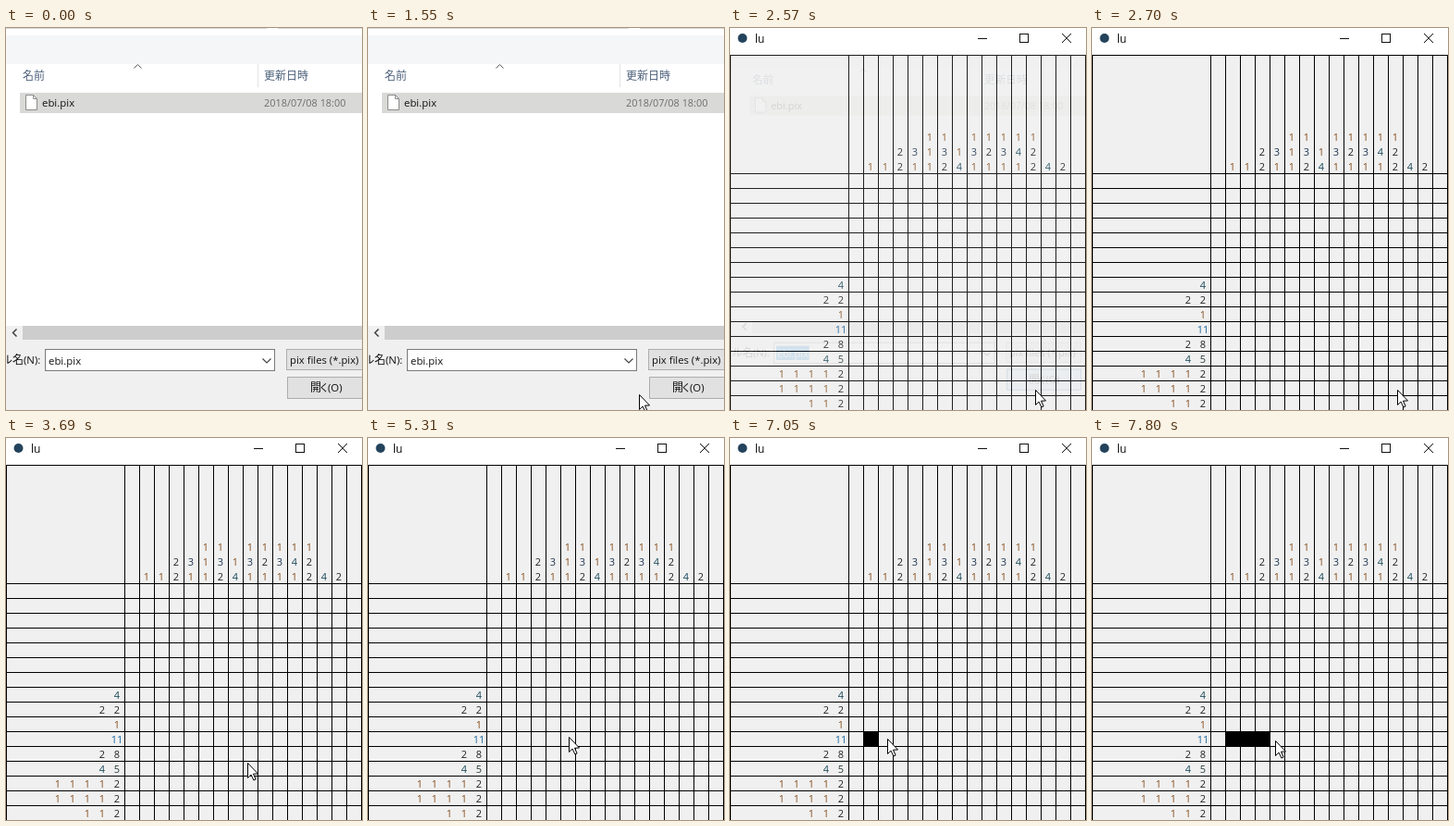
These frames come from a looping animation (385x413 px, 8000 ms). An HTML page with a canvas:

```html
<!DOCTYPE html>
<html lang="ja">
<head>
<meta charset="utf-8">
<title>Puzzle</title>
<style>
  html, body { margin: 0; width: 100%; height: 100%; overflow: hidden; background: #fff; }
  canvas { display: block; }
</style>
</head>
<body>
<canvas id="stage" width="385" height="413"></canvas>
<script>
const ctx = document.getElementById('stage').getContext('2d');
const W = 385, H = 413, LOOP = 8000, CELL = 16, LEFT = 128, TOP = 157;
const LATIN = '"Open Sans", "Noto Sans", sans-serif';
const KANJI = '"Noto Sans CJK JP", "Noto Sans CJK", sans-serif';

const PRESS = 2300, SELECT = 2440, FADE = 2570, READY = 2700;
const FILLS = [6810, 7300, 7550];

// Pointer moves: first step, last step, step count, end x, end y
const START = [304, 414];
const MOVES = [
  [680, 1180, 5, 281, 397],
  [1430, 1800, 4, 330, 391],
  [3070, 3320, 3, 241, 342],
  [3690, 3690, 1, 261, 351],
  [3810, 3810, 1, 273, 351],
  [4060, 4060, 1, 266, 363],
  [4180, 4430, 3, 235, 331],
  [4810, 4930, 2, 227, 324],
  [5310, 5310, 1, 217, 323],
  [5430, 5560, 2, 206, 322],
  [5930, 6060, 2, 157, 323],
  [6310, 6310, 1, 157, 325],
  [6810, 7050, 3, 170, 325],
  [7300, 7800, 5, 198, 327]
];

const COLS = ['', '1', '1', '22', '31', '111', '132', '14', '131',
  '121', '131', '141', '122', '4', '2'];
const ROWS = ['4', '2 2', '1', '11', '2 8', '4 5', '1 1 1 1 2', '1 1 1 1 2', '1 1 2'];
const INK = { 1: '#86501f', 2: '#222222', 3: '#1d3350', 4: '#164656',
  5: '#2a3a3a', 8: '#222222', 11: '#1c66a0' };

function rect(x, y, w, h, color) {
  ctx.fillStyle = color;
  ctx.fillRect(x, y, w, h);
}

function box(x, y, w, h, fill, edge) {
  rect(x, y, w, h, edge);
  rect(x + 1, y + 1, w - 2, h - 2, fill);
}

function line(points, color, width = 1, close = false) {
  ctx.beginPath();
  points.forEach(([x, y]) => ctx.lineTo(x, y));
  if (close) ctx.closePath();
  ctx.strokeStyle = color;
  ctx.lineWidth = width;
  ctx.stroke();
}

function text(str, x, y, size, color, family = LATIN, align = 'left') {
  ctx.font = `${size}px ${family}`;
  ctx.textAlign = align;
  ctx.fillStyle = color;
  ctx.fillText(str, x, y);
}

function pointer(t) {
  let [x, y] = START;
  for (const [from, to, n, ex, ey] of MOVES) {
    if (t < from) break;
    const step = n > 1 ? Math.floor((t - from) / (to - from) * (n - 1) + 1e-6) + 1 : 1;
    const p = Math.min(step, n) / n;
    x += (ex - x) * p;
    y += (ey - y) * p;
    if (p < 1) break;
  }
  return [Math.round(x), Math.round(y)];
}

function drawPointer(x, y) {
  const shape = [[0, 0], [0, 16], [3.6, 12.6], [6.4, 18.5], [8.6, 17.5], [6, 11.7], [11, 11.5]]
    .map(([px, py]) => [x + px + 0.5, y + py + 0.5]);
  ctx.beginPath();
  shape.forEach(([px, py]) => ctx.lineTo(px, py));
  ctx.closePath();
  ctx.fillStyle = '#fff';
  ctx.fill();
  line(shape, '#000', 1, true);
}

function drawFileIcon() {
  const page = [[21.5, 72.5], [29.5, 72.5], [33.5, 76.5], [33.5, 88.5], [21.5, 88.5]];
  ctx.beginPath();
  page.forEach(([x, y]) => ctx.lineTo(x, y));
  ctx.fillStyle = '#fff';
  ctx.fill();
  line(page, '#8c8c8c', 1, true);
  line([[29.5, 72.5], [29.5, 76.5], [33.5, 76.5]], '#8c8c8c');
}

function drawDialog(t, px, py) {
  // Drawn past the stage so that it can shrink while closing
  rect(-40, -40, 480, 500, '#fff');
  rect(-40, 0, 322, 1, '#d9d9d9');
  rect(294, 0, 140, 1, '#d9d9d9');
  rect(-40, 8, 480, 31, '#f5f6f8');
  line([[138.5, 43.5], [142.5, 39.5], [146.5, 43.5]], '#5c5c5c');
  rect(272, 39, 1, 25, '#e2e2e2');
  text('名前', 18, 56, 12, '#4c607a', KANJI);
  text('更新日時', 279, 56, 12, '#4c607a', KANJI);

  rect(15, 70, 400, 22, '#d9d9d7');
  drawFileIcon();
  text('ebi.pix', 39, 85, 11.4, '#111');
  text('2018/07/08 18:00', 279, 85, 10.9, '#6d6d6d');

  rect(-40, 322, 480, 140, '#f0f0f0');
  rect(18, 322, 420, 15, '#cdcdcd');
  line([[11.5, 325.5], [7.5, 329.5], [11.5, 333.5]], '#404040', 1.5);

  text('ファイル名', 19, 363, 12, '#111', KANJI, 'right');
  text('(N):', 19, 363, 11.4, '#111');
  box(42, 347, 249, 24, '#fff', '#7a7a7a');
  const selected = t >= SELECT;
  if (selected) rect(45, 351, 37, 16, '#0078d7');
  text('ebi.pix', 46, 364, 11.4, selected ? '#fff' : '#111');
  line([[277.5, 357.5], [282, 362], [286.5, 357.5]], '#444', 1.2);

  box(303, 347, 85, 23, '#e1e1e1', '#adadad');
  text('pix files (*.pix)', 307, 363, 11.3, '#111');

  let fill = '#e1e1e1', edge = '#adadad';
  if (t >= PRESS) {
    fill = '#cce4f7';
    edge = '#005499';
  } else if (px >= 304 && py <= 401) {
    fill = '#e5f1fb';
    edge = '#0078d7';
  }
  box(304, 377, 84, 24, fill, edge);
  text('開', 329, 393, 12, '#111', KANJI);
  text('く', 338.5, 393, 11, '#111', KANJI);
  text('(O)', 348, 393, 11.4, '#111');
}

function drawHints() {
  const put = (s, x, y) => text(s, x, y, 11, INK[s], LATIN, 'center');
  COLS.forEach((hint, i) => [...hint].reverse().forEach((s, k) =>
    put(s, LEFT + CELL * i + 8, TOP - 3 - CELL * k)));
  ROWS.forEach((hint, i) => hint.split(' ').reverse().forEach((s, k) =>
    put(s, LEFT - 8 - CELL * k, TOP + CELL * (i + 8) - 3)));
}

function drawPuzzle(t) {
  rect(0, 0, W, H, '#f0f0f0');
  rect(0, 0, W, 29, '#fff');
  ctx.beginPath();
  ctx.arc(13.5, 11, 5, 0, Math.PI * 2);
  ctx.fillStyle = '#24435c';
  ctx.fill();
  text('lu', 27, 16, 12, '#111');
  rect(268, 11, 10, 1, '#111');
  box(313, 6, 10, 10, '#fff', '#111');
  line([[359, 6], [369, 16]], '#111');
  line([[369, 6], [359, 16]], '#111');

  rect(0, 29, W, 1, '#000');
  rect(0, 29, 1, H - 29, '#000');
  for (let x = LEFT; x < W; x += CELL) rect(x, 29, 1, H - 29, '#000');
  for (let y = TOP; y < H; y += CELL) rect(0, y, W, 1, '#000');
  drawHints();
  FILLS.forEach((at, i) => {
    if (t >= at) rect(LEFT + CELL * (i + 1), TOP + CELL * 10, CELL + 1, CELL + 1, '#000');
  });
}

function draw(t) {
  const [px, py] = pointer(t);
  if (t < FADE) {
    drawDialog(t, px, py);
  } else {
    drawPuzzle(t);
    if (t < READY) {
      ctx.save();
      ctx.beginPath();
      ctx.rect(0, 24, W, H);
      ctx.clip();
      // Each dialog part is blended, so flatten it first
      ctx.globalAlpha = 0.12;
      ctx.drawImage(ghost, 0, 0);
      ctx.restore();
    }
  }
  drawPointer(px, py);
}

function makeGhost() {
  const copy = document.createElement('canvas');
  copy.width = W;
  copy.height = H;
  ctx.save();
  ctx.translate(6.7, 6);
  ctx.scale(0.962, 0.962);
  drawDialog(SELECT, 330, 391);
  ctx.restore();
  copy.getContext('2d').drawImage(ctx.canvas, 0, 0);
  return copy;
}

const ghost = makeGhost();

function tick() {
  draw(performance.now() % LOOP);
  requestAnimationFrame(tick);
}
tick();
</script>
</body>
</html>
```
